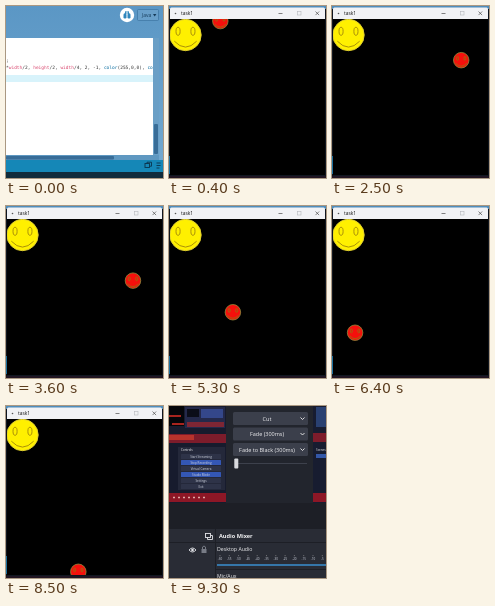
An HTML page that plays this animation: 157x172 px, repeating every 9400 ms.

```html
<!DOCTYPE html>
<html lang="en">
<head>
<meta charset="utf-8">
<title>task1</title>
<style>
  html, body { margin: 0; width: 100%; height: 100%; overflow: hidden; background: #000; }
  svg { display: block; width: 100vw; height: 100vh; }
  text { font-family: "Open Sans", "Noto Sans", sans-serif; white-space: pre; }
  .code { font: 4.53px "DejaVu Sans Mono", monospace; fill: #333; }
  .var { fill: #d9486f; }
  .fn { fill: #0a6da0; }
  .mixer { fill: #f2f2f4; }
  .tiny { font-size: 3px; fill: #d5d9e4; text-anchor: middle; }
</style>
</head>
<body>
<svg viewBox="0 0 157 172" preserveAspectRatio="none">
  <defs>
    <linearGradient id="sky" x2="0" y2="1">
      <stop offset="0" stop-color="#5b97c5"/>
      <stop offset="1" stop-color="#74a9d0"/>
    </linearGradient>
    <clipPath id="pane"><rect x="1" y="13" width="155" height="156"/></clipPath>
    <g id="face" fill="none">
      <ellipse cx="-12" cy="-6" rx="3.3" ry="6.5"/>
      <ellipse cx="12" cy="-6" rx="3.3" ry="6.5"/>
      <path d="M-18 10Q0 29 18 10"/>
    </g>
  </defs>

  <g id="editor">
    <rect width="157" height="172" fill="url(#sky)"/>
    <circle cx="121" cy="9" r="7.2" fill="#fff"/>
    <g fill="#2f86bd">
      <rect x="117.5" y="7.5" width="3" height="5" rx="1.2"/>
      <rect x="121.5" y="7.5" width="3" height="5" rx="1.2"/>
      <path d="M118.5 8l1-3h1v3zM121.5 8v-3h1l1 3z"/>
    </g>
    <rect x="131.5" y="3.5" width="21" height="11" rx="1" fill="#69a0ca" stroke="#3d75a3" stroke-width=".7"/>
    <text x="136" y="11" font-size="5" fill="#153a58">Java</text>
    <path d="M147 8h3.4l-1.7 2.4z" fill="#153a58"/>
    <rect y="32" width="147" height="117" fill="#fff"/>
    <rect y="69" width="147" height="7" fill="#d8f3fb"/>
    <text class="code" x="0" y="56">;</text>
    <text class="code" x="0" y="62.5">*<tspan class="var">width</tspan>/2, <tspan class="var">height</tspan>/2, <tspan class="var">width</tspan>/4, 2, -1, <tspan class="fn">color</tspan>(255,0,0), <tspan class="fn">co</tspan></text>
    <rect x="147" y="32" width="6" height="117" fill="#6a9fc6"/>
    <rect x="148" y="118" width="4" height="30" rx="1" fill="#386d98"/>
    <rect y="149" width="153" height="5" fill="#5f98c1"/>
    <rect y="150" width="108" height="3.5" rx="1" fill="#386d98"/>
    <rect y="154" width="157" height="12" fill="#1587b7"/>
    <g fill="none" stroke="#0b344d" stroke-width=".9">
      <rect x="139" y="157.5" width="4.5" height="4"/>
      <path d="M141 157.5v-1.3h4.5v4h-2M150.5 157h4M150.5 159.5h4M150.5 162h3"/>
    </g>
    <rect y="166" width="157" height="6" fill="#102b3b"/>
  </g>

  <g id="sketch">
    <rect width="157" height="172" fill="#10161f"/>
    <rect width="157" height="3" fill="#4f8dbb"/>
    <rect y="150" width="1" height="18" fill="#1c73a3"/>
    <path d="M1 14V3q0-1.5 1.5-1.5H154.5q1.5 0 1.5 1.5V14z" fill="#f1f2f5"/>
    <circle cx="6.5" cy="7.5" r=".8" fill="#555"/>
    <text x="12" y="9.2" font-size="4.9" fill="#111">task1</text>
    <g fill="none" stroke="#333" stroke-width=".6">
      <path d="M109.5 7.5h4M146.5 5.5l3.6 3.6M150.1 5.5l-3.6 3.6"/>
      <rect x="128.5" y="5.5" width="3.5" height="3.5" stroke="#b5b7bc"/>
    </g>
    <rect x="1" y="13" width="155" height="156" fill="#000"/>
    <rect y="170" width="157" height="2" fill="#211522"/>
    <g clip-path="url(#pane)">
      <g transform="translate(16.5 29) scale(.62)" stroke="#a9900a" stroke-width="1.6">
        <circle r="25.3" fill="#fff000" stroke="#e0cf30"/>
        <use href="#face"/>
      </g>
      <g id="ball" stroke="#8f7a10" stroke-width="2.4">
        <circle r="25" fill="#f5100c" stroke="#8f8a3c" stroke-width="2.6"/>
        <use href="#face"/>
      </g>
    </g>
  </g>

  <g id="studio">
    <rect width="157" height="172" fill="#1d1f26"/>
    <rect width="57" height="97" fill="#171b2d"/>
    <rect width="15" height="20" fill="#05060a"/>
    <path d="M0 9h12v2H0zM3 17h12v2H3z" fill="#a8241e"/>
    <rect x="16" y="1" width="40" height="21" fill="#24294a"/>
    <rect x="18" y="3" width="12" height="8" fill="#0b0d18"/>
    <rect x="32" y="3" width="22" height="9" fill="#34478a"/>
    <rect x="18" y="16" width="37" height="5" fill="#7e2634"/>
    <rect y="28" width="57" height="9" fill="#7d1c2b"/>
    <rect y="29" width="25" height="5" fill="#b8332c"/>
    <rect x="9" y="41" width="47" height="43" fill="#24283a"/>
    <text x="12" y="45" font-size="3" fill="#fff">Controls</text>
    <g id="controls"></g>
    <rect y="87" width="57" height="9" fill="#8d1726"/>
    <path d="M4 91.5h34" stroke="#e1a9a7" stroke-width="1.6" stroke-dasharray="2 3"/>
    <rect x="57" width="87" height="97" fill="#22252d"/>
    <g id="fades"></g>
    <path d="M67 57.5H138" stroke="#3d414c" stroke-width="1.2"/>
    <rect x="65.3" y="52.5" width="4" height="10" rx="1" fill="#d9dade"/>
    <rect x="144" width="13" height="97" fill="#171c30"/>
    <rect x="147" y="1" width="10" height="20" fill="#294071"/>
    <rect x="144" y="27" width="13" height="9" fill="#7d1c2b"/>
    <text x="147" y="45" font-size="3" fill="#eee">Scenes</text>
    <rect x="147" y="48" width="10" height="4" fill="#3357a8"/>
    <rect x="144" y="87" width="13" height="9" fill="#8d1726"/>
    <rect y="123" width="46" height="49" fill="#292c35"/>
    <rect x="47" y="123" width="110" height="49" fill="#292c35"/>
    <path d="M0 136.5H157" stroke="#1d1f26"/>
    <g fill="none" stroke="#e3e4e8" stroke-width=".9">
      <rect x="36.5" y="127.5" width="5" height="4"/>
      <path d="M38.5 131.5v2h5v-4h-2M20 144q3.5-4 7 0q-3.5 4-7 0"/>
    </g>
    <circle cx="23.5" cy="144" r="1.3" fill="#e3e4e8"/>
    <rect x="32.5" y="143" width="5" height="4" fill="#777b85"/>
    <path d="M33.5 143v-2q1.5-2 3 0v2" fill="none" stroke="#777b85"/>
    <text class="mixer" x="50" y="132" font-size="5.6" font-weight="700">Audio Mixer</text>
    <text class="mixer" x="48" y="144.5" font-size="5.2">Desktop Audio</text>
    <g id="ticks"></g>
    <path d="M48 159H157" stroke="#3a8fd0" stroke-width="1.6"/>
    <path d="M47 163.5H157" stroke="#1d1f26"/>
    <text class="mixer" x="48" y="172" font-size="5.2">Mic/Aux</text>
  </g>
</svg>
<script>
  const LOOP = 9400, STEP = 100, OPEN = 100, STOP = 8540, CLOSE = 9300;
  const $ = id => document.getElementById(id);

  $('controls').innerHTML = ['Start Streaming', 'Stop Recording', 'Virtual Camera', 'Studio Mode', 'Settings', 'Exit']
    .map((label, i) => {
      const y = 48 + i * 6;
      const fill = i === 1 || i === 3 ? '#3457b5' : '#2e3348';
      return `<rect x="12" y="${y}" width="40" height="5" rx=".6" fill="${fill}"/>
        <text class="tiny" x="32" y="${y + 3.6}">${label}</text>`;
    }).join('');

  $('fades').innerHTML = ['Cut', 'Fade (300ms)', 'Fade to Black (300ms)']
    .map((label, i) => {
      const y = 6 + i * 15.5;
      return `<rect x="64" y="${y}" width="75" height="13" rx="1.5" fill="#3b3f4b"/>
        <text class="mixer" x="98" y="${y + 8.8}" font-size="5.5" text-anchor="middle">${label}</text>
        <path d="M131.5 ${y + 5.5}l2 2l2-2" fill="none" stroke="#eee" stroke-width=".9"/>`;
    }).join('');

  $('ticks').innerHTML = Array.from({ length: 12 }, (_, i) => {
    const x = 51 + i * 9.3;
    return `<path d="M${x} 149v1.2" stroke="#999" stroke-width=".6"/>
      <text class="tiny" x="${x}" y="153.5">${i * 5 - 60}</text>`;
  }).join('');

  // Reflect a straight run between two walls.
  function bounce(p, low, high) {
    const span = high - low;
    const d = (((p - low) % (2 * span)) + 2 * span) % (2 * span);
    return low + (d > span ? 2 * span - d : d);
  }

  function show(id, on) {
    $(id).style.display = on ? '' : 'none';
  }

  function draw(time) {
    const t = Math.floor((time % LOOP) / STEP) * STEP;
    const run = Math.min(t, STOP) - 1200;
    const x = bounce(81 + run * 0.0371, 8.75, 148.5);
    const y = bounce(30 + run * 0.0186, 13, 169);
    $('ball').setAttribute('transform', `translate(${x} ${y}) scale(.31)`);
    show('editor', t < OPEN);
    show('sketch', t >= OPEN && t < CLOSE);
    show('studio', t >= CLOSE);
  }

  const start = performance.now();
  function tick() {
    draw(performance.now() - start);
    requestAnimationFrame(tick);
  }
  tick();
</script>
</body>
</html>
```
